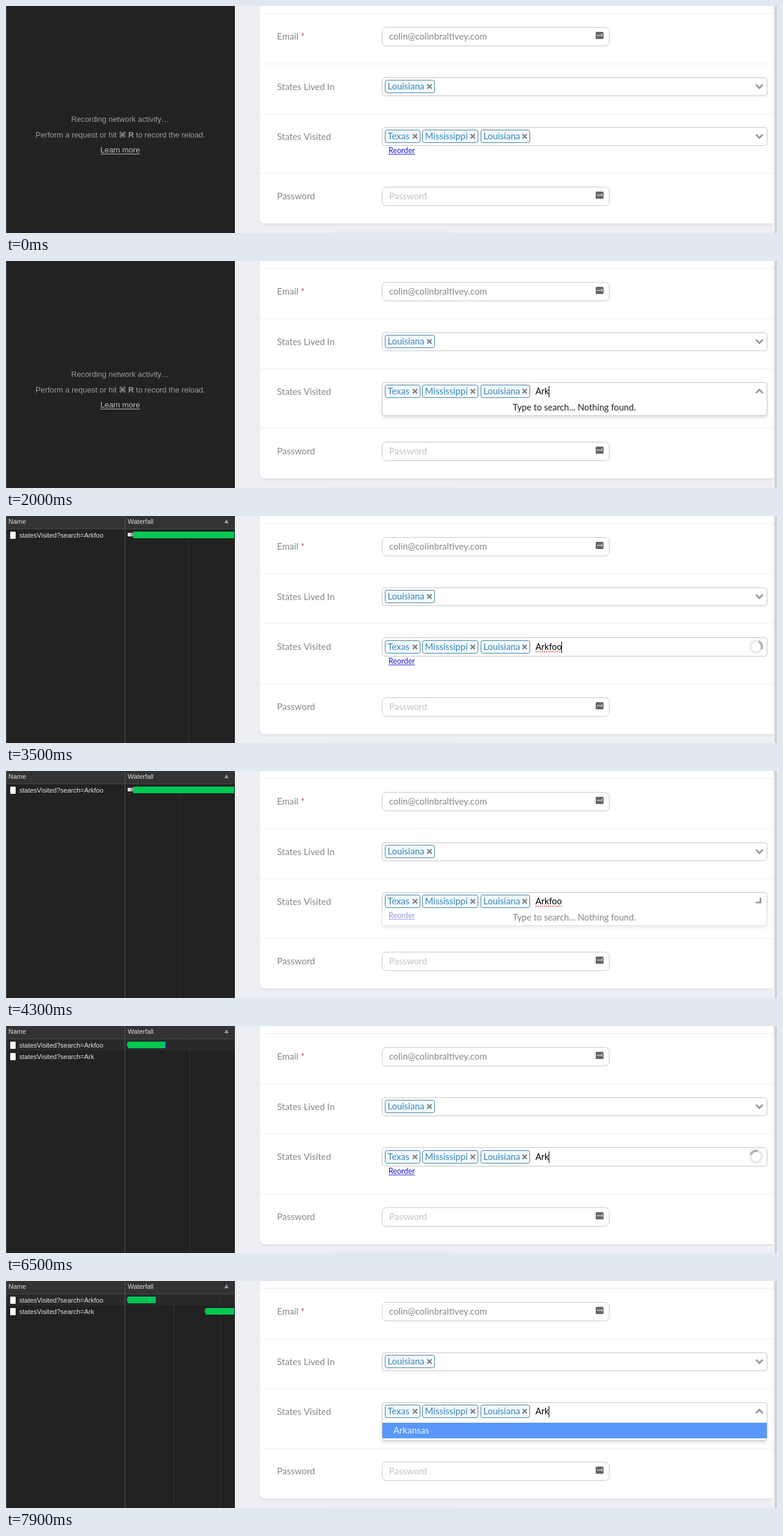
These frames come from a looping animation (1280x378 px, 8 s). An HTML page with a canvas:

```html
<!DOCTYPE html>
<html lang="en">
<head>
<meta charset="utf-8">
<title>Searchable select</title>
<style>
  html, body { margin: 0; width: 100%; height: 100%; overflow: hidden; background: #eeeff4; }
  canvas { display: block; }
</style>
</head>
<body>
<canvas id="stage" width="1280" height="378"></canvas>
<script>
const ctx = document.getElementById('stage').getContext('2d');
const LOOP = 8000, TICK = 100;
const FORM = 'Lato, sans-serif';
const TOOLS = '"Liberation Sans", "DejaVu Sans", sans-serif';
const GREY = '#84888c', LINK = '#1c14d8';

// Network log times, relative to the first request
const FIRST_REQUEST = 3160, FIRST_LENGTH = 1170, SECOND_OFFSET = 3255;

const TYPED = [
  [0, ''], [1400, 'A'], [1700, 'Ark'], [2100, 'Arkf'], [2400, 'Arkfo'],
  [2500, 'Arkfoo'], [5500, 'Arkfo'], [5700, 'Arkf'], [5900, 'Ark']
];
const MENU_FADE = [
  [300, 0], [600, 1], [3000, 1], [3200, 0], [4180, 0],
  [4400, 1], [6300, 1], [6500, 0], [7580, 0], [7800, 1]
];

const within = (t, a, b) => t >= a && t < b;

function lastStep(steps, t) {
  return steps.filter(s => s[0] <= t).pop()[1];
}

function ramp(keys, t) {
  if (t <= keys[0][0]) return keys[0][1];
  for (let i = 1; i < keys.length; i++) {
    const [a, v] = keys[i - 1], [b, w] = keys[i];
    if (t <= b) return v + (w - v) * (t - a) / (b - a);
  }
  return keys[keys.length - 1][1];
}

function rect(x, y, w, h, color) {
  ctx.fillStyle = color;
  ctx.fillRect(x, y, w, h);
}

function box(x, y, w, h, radius, fill, stroke) {
  ctx.beginPath();
  ctx.roundRect(x, y, w, h, radius);
  if (fill) { ctx.fillStyle = fill; ctx.fill(); }
  if (stroke) { ctx.strokeStyle = stroke; ctx.lineWidth = 1; ctx.stroke(); }
}

function path(points, color, width) {
  ctx.beginPath();
  points.forEach(([x, y], i) => i ? ctx.lineTo(x, y) : ctx.moveTo(x, y));
  ctx.strokeStyle = color;
  ctx.lineWidth = width;
  ctx.stroke();
}

function text(str, x, y, color, size = 15, family = FORM, align = 'left', weight = '') {
  ctx.font = `${weight} ${size}px ${family}`;
  ctx.textAlign = align;
  ctx.fillStyle = color;
  ctx.fillText(str, x, y);
  return ctx.measureText(str).width;
}

function drawIdlePanel() {
  const color = '#9c9c9c', size = 12.85;
  text('Recording network activity…', 189.5, 193, color, size, TOOLS, 'center');
  let x = 49;
  [['Perform a request or hit ', ''], ['⌘ R', 'bold'], [' to record the reload.', '']]
    .forEach(([str, weight]) => { x += text(str, x, 219, color, size, TOOLS, 'left', weight); });
  const w = text('Learn more', 189.5, 244, '#bdbdbd', size, TOOLS, 'center');
  rect(189.5 - w / 2, 246, w, 1, '#bdbdbd');
}

function gridStep(span, width) {
  const min = 64;
  const step = 10 ** Math.ceil(Math.log10(span * min / width));
  const px = step * width / span;
  return px >= 5 * min ? step / 5 : px >= 2 * min ? step / 2 : step;
}

function drawLogRow(y, name) {
  box(7, y - 5.5, 9, 12, 1, '#fff');
  text(name, 22, y + 4, '#e2e2e2', 11, TOOLS);
}

function drawLog(t) {
  const left = 198, right = 379, barLeft = 202.5, barWidth = 177;
  const second = t >= 6400, settled = t >= 4900;
  const span = second ? Math.min(t - FIRST_REQUEST, 4500)
    : settled ? FIRST_LENGTH : Math.min(t - FIRST_REQUEST, 980);
  const scale = barWidth / span;

  rect(1, 0, 378, 21, '#333');
  rect(1, 21, 378, 1, '#484848');
  if (second) rect(1, 22, 378, 19, '#292929');
  const step = gridStep(span, barWidth);
  for (let s = step; s * scale < barWidth; s += step) {
    rect(Math.round(left + 1 + s * scale), 22, 1, 356, '#323232');
  }
  rect(197, 0, 1, 378, '#525252');
  text('Name', 4, 13, '#dadada', 11, TOOLS);
  text('Waterfall', 202, 13, '#dadada', 11, TOOLS);
  ctx.beginPath();
  ctx.moveTo(366, 5.5);
  ctx.lineTo(369.5, 12);
  ctx.lineTo(362.5, 12);
  ctx.fillStyle = '#9b9b9b';
  ctx.fill();

  drawLogRow(31.5, 'statesVisited?search=Arkfoo');
  if (second) drawLogRow(50.5, 'statesVisited?search=Ark');

  ctx.save();
  ctx.beginPath();
  ctx.rect(left, 22, right - left, 356);
  ctx.clip();
  const green = '#00c853', blue = '#119fd0', top = 26, height = 11;
  if (settled) {
    const w = FIRST_LENGTH * scale;
    rect(201.5, 28, 1, 6, '#ccc');
    rect(barLeft, top, w, height, green);
    rect(barLeft + w - 1.5, top, 1.5, height, blue);
  } else {
    rect(202, 28, 5, 6, '#ddd');
    rect(207, 28, 4, 6, '#a5a19a');
    rect(211, top, 168, height, green);
  }
  if (second && t > 6500) {
    const x = barLeft + SECOND_OFFSET * scale;
    rect(x, 47, 1, 6, '#ccc');
    rect(x + 1, top + 19, right - x, height, green);
    if (t >= 7700) rect(right - 1.5, top + 19, 1.5, height, blue);
  }
  ctx.restore();
}

function drawPanel(t) {
  rect(0, 0, 380, 378, '#222');
  rect(0, 0, 1, 378, '#555');
  if (t < 3200) drawIdlePanel();
  else drawLog(t);
}

function drawInput(y, str, color) {
  box(624.5, y + 0.5, 377, 31, 7, '#fff', '#bccbd7');
  text(str, 636, y + 21, color);
  box(979, y + 8, 13, 12, 1.5, '#666');
  for (let i = 0; i < 3; i++) rect(981 + i * 2.7, y + 13, 1.6, 1.6, '#fff');
  rect(989, y + 11, 1, 5, '#fff');
}

function drawTag(x, w, y, name) {
  box(x + 0.5, y + 0.5, w - 1, 21, 3, '#f1f9fd', '#457f9a');
  text(name, x + 4.5, y + 16, '#3c87bb');
  const cx = x + w - 9, cy = y + 11, r = 3.6;
  path([[cx - r, cy - r], [cx + r, cy + r]], '#858585', 2.2);
  path([[cx + r, cy - r], [cx - r, cy + r]], '#858585', 2.2);
}

function drawChevron(y, angle) {
  ctx.save();
  ctx.translate(1250.7, y);
  ctx.rotate(angle);
  path([[-5.6, -3], [0, 2.8], [5.6, -3]], '#989898', 2.8);
  ctx.restore();
}

function drawSpinner(y, angle) {
  const arc = (from, to, color) => {
    ctx.beginPath();
    ctx.arc(1245.5, y, 9.5, from, to);
    ctx.strokeStyle = color;
    ctx.lineWidth = 4;
    ctx.stroke();
  };
  arc(0, Math.PI * 2, '#ececec');
  arc(angle + Math.PI * 0.75, angle + Math.PI * 1.25, '#b2b2b2');
}

function drawMenu(alpha, found) {
  const top = 233, bottom = found ? 266 : 258;
  const panel = () => ctx.roundRect(624.5, top - 7, 639, bottom - top + 6.5, 4);
  ctx.save();
  ctx.globalAlpha = alpha;
  ctx.save();
  ctx.beginPath();
  ctx.rect(610, top, 670, 60);
  ctx.clip();

  // The shadow falls only outside the panel, so it stays white while fading
  ctx.save();
  ctx.beginPath();
  ctx.rect(610, top - 20, 670, 80);
  panel();
  ctx.clip('evenodd');
  ctx.shadowColor = 'rgba(0,0,0,.15)';
  ctx.shadowBlur = 6;
  ctx.shadowOffsetY = 3;
  ctx.beginPath();
  panel();
  ctx.fillStyle = '#fff';
  ctx.fill();
  ctx.restore();

  ctx.beginPath();
  panel();
  ctx.fillStyle = '#fff';
  ctx.fill();
  ctx.strokeStyle = '#c8c8c8';
  ctx.lineWidth = 1;
  ctx.stroke();
  ctx.restore();
  if (found) {
    rect(625, 236, 638, 26, '#5897fb');
    text('Arkansas', 643, 254, '#eef4ff');
  } else {
    text('Type to search... Nothing found.', 943.5, 249, '#222', 14.65, FORM, 'center');
  }
  ctx.restore();
}

function drawTyped(t, y) {
  const str = lastStep(TYPED, t);
  const w = text(str, 879, y + 5, '#000', 14.5);
  if (within(t, 3200, 5500)) {
    for (let x = 880; x < 879 + w; x += 3.5) {
      ctx.beginPath();
      ctx.arc(x, y + 8, 1.1, 0, Math.PI * 2);
      ctx.fillStyle = '#e0525a';
      ctx.fill();
    }
  }
  const caret = within(t, 1100, 4000) || t >= 6400;
  if (caret) rect(Math.round(878.5 + w), y - 9, 1, 19, '#000');
}

function drawVisited(t, loading, shift) {
  const open = ramp(MENU_FADE, t);
  const y = 217 + shift;
  const expanded = open > 0 && !loading;
  box(624.5, 202.5, 639, 30 + shift, expanded ? [4, 4, 0, 0] : 4, '#fff', '#c5c5c5');
  if (expanded) rect(625, 231.5, 638, 2, '#fff');
  drawTag(629, 59, y - 11, 'Texas');
  drawTag(691, 93, y - 11, 'Mississippi');
  drawTag(788, 82, y - 11, 'Louisiana');
  const w = text('Reorder', 635, 245 + shift, LINK, 12.6);
  rect(635, 246.5 + shift, w, 1, LINK);
  if (open > 0) drawMenu(open, t >= 7500);
  drawTyped(t, y);
  if (loading) drawSpinner(217.5, (t - 6310) / 1100 * Math.PI * 2);
  else drawChevron(217, -Math.PI * open ** 2.3);
}

function drawForm(t) {
  const loading = within(t, 3100, 4200) || within(t, 6400, 7600);
  const shift = loading ? 1 : 0;

  rect(380, 0, 900, 378, '#eeeff4');
  rect(540, 376, 202, 2, '#e9eaef');
  ctx.save();
  ctx.shadowColor = 'rgba(0,0,0,.07)';
  ctx.shadowBlur = 4;
  ctx.shadowOffsetY = 2;
  box(421, -20, 870, 382 + shift, 8, '#fff');
  ctx.restore();
  rect(1273, 0, 3, 378, '#f2f2f4');
  rect(1276, 0, 4, 378, '#d2d2d4');
  [12, 96, 179, 278 + shift].forEach(y => rect(421, y, 852, 1, '#eceff2'));

  const w = text('Email ', 450, 56, GREY);
  text('*', 450 + w, 56, '#d9434e');
  text('States Lived In', 450, 140, GREY);
  text('States Visited', 450, 223, GREY);
  text('Password', 450, 322 + shift, GREY);

  drawInput(35, 'colin@colinbraltivey.com', GREY);
  drawInput(301 + shift, 'Password', '#c0c4c8');

  box(624.5, 119.5, 639, 30, 4, '#fff', '#c5c5c5');
  drawTag(629, 83, 123, 'Louisiana');
  drawChevron(134, 0);
  drawVisited(t, loading, shift);
}

const start = performance.now();

function frame(now) {
  const t = Math.floor(Math.max(0, now - start) % LOOP / TICK) * TICK;
  drawForm(t);
  drawPanel(t);
  requestAnimationFrame(frame);
}
frame(start);
</script>
</body>
</html>
```
